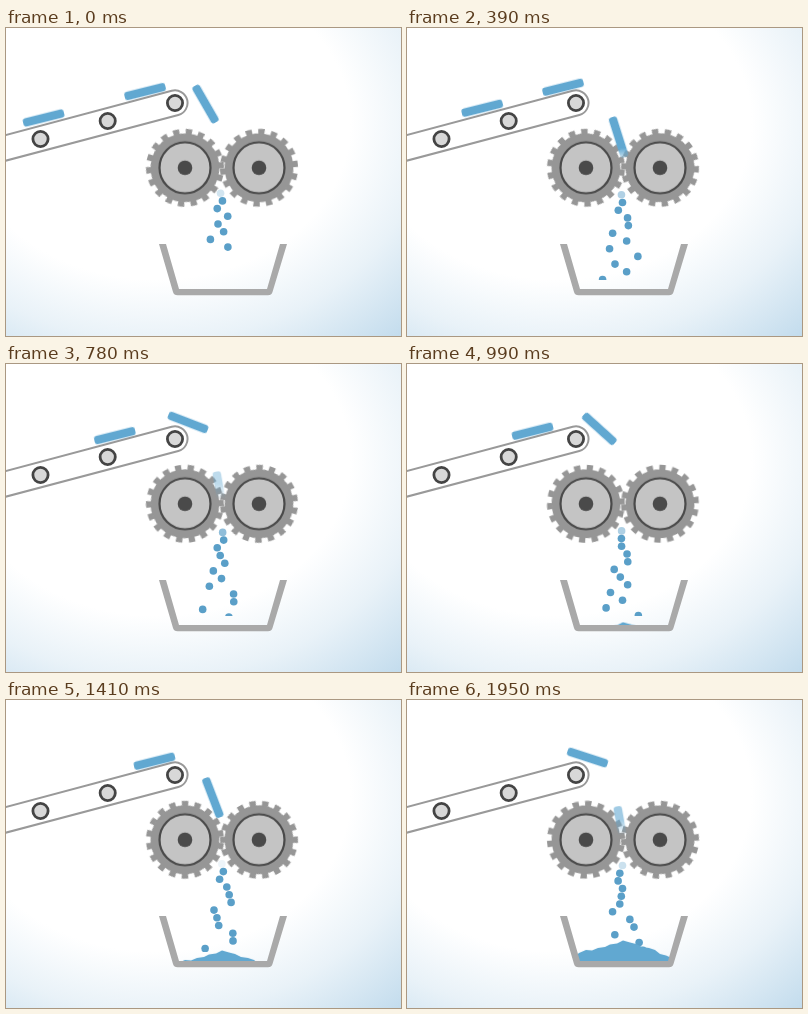
Write an HTML page without scripts that moves like this. It is 395 by 308 pixels and loops after 1980 ms.

```html
<!DOCTYPE html>
<html lang="en">
<head>
<meta charset="utf-8">
<title>Shredder</title>
<style>
@property --fall { syntax: "<number>"; inherits: true; initial-value: 0; }

html, body { margin: 0; width: 100%; height: 100%; overflow: hidden; background: #fff; }
svg { display: block; width: 100vw; height: 100vh; }

.bar, .gear, .drops, .pile { animation: 1980ms linear infinite; }
.bar { fill: #61a8d1; }
.first { animation-name: ride; }
.second { animation-name: tip; }
.third { animation-name: drop; }
.gear { animation-name: spin; }
.reverse { animation-direction: reverse; }
.pile { fill: #61a8d1; animation-name: rise; }

/* each drop leaves the nip (215.5, 161) along its own slope --s */
.drops { fill: #5a9fc8; animation-name: fall; }
.drops circle {
  --y: calc(219 - 7.7 * var(--k) + var(--fall));
  transform: translate(calc((215.5 + var(--s) * (var(--y) - 161)) * 1px), calc(var(--y) * 1px));
  opacity: calc((var(--y) - 163) / 8);
}

@keyframes fall { to { --fall: 203.6; } }
@keyframes spin { to { transform: rotate(160deg); } }
@keyframes rise { from { transform: translate(-1px, 37px); } to { transform: translate(-1px, .4px); } }

@keyframes ride {
  0% { transform: translate(37.5px, 90px) rotate(-14deg); }
  10.6% { transform: translate(58.3px, 84.5px) rotate(-14deg); }
  28.8% { transform: translate(92px, 76px) rotate(-14deg); }
  50% { transform: translate(125.5px, 67.3px) rotate(-14deg); }
  62.1% { transform: translate(141px, 63.2px) rotate(-14deg); }
  81.8% { transform: translate(157px, 59px) rotate(-14deg); }
  89.4% { transform: translate(169px, 56.7px) rotate(1deg); }
  98.5% { transform: translate(180.5px, 57.5px) rotate(18deg); }
  100% { transform: translate(182px, 58.3px) rotate(21deg); }
}
@keyframes tip {
  0% { transform: translate(139px, 63.6px) rotate(-14deg); }
  10.6% { transform: translate(150px, 60.9px) rotate(-14deg); }
  21.2% { transform: translate(157px, 59px) rotate(-14deg); }
  28.8% { transform: translate(169px, 56.7px) rotate(1deg); }
  37.9% { transform: translate(180.5px, 57.5px) rotate(18deg); }
  50% { transform: translate(192.3px, 64.8px) rotate(42deg); }
  60.6% { transform: translate(199.5px, 76px) rotate(60deg); }
  62.1% { transform: translate(200.3px, 78px) rotate(62deg); }
  71.2% { transform: translate(206.8px, 97.5px) rotate(69deg); }
  81.8% { transform: translate(212.3px, 111px) rotate(73deg); }
  89.4% { transform: translate(213px, 117px) rotate(76deg); opacity: 1; }
  98.5% { transform: translate(214px, 127px) rotate(80deg); opacity: .6; }
  100% { transform: translate(214px, 128px) rotate(80deg); opacity: .5; }
}
@keyframes drop {
  0% { transform: translate(199.5px, 76px) rotate(60deg); }
  1.5% { transform: translate(200.3px, 78px) rotate(62deg); }
  10.6% { transform: translate(206.8px, 97.5px) rotate(69deg); }
  21.2% { transform: translate(212.3px, 111px) rotate(73deg); }
  28.8% { transform: translate(213px, 117px) rotate(76deg); opacity: 1; }
  37.9% { transform: translate(214px, 127px) rotate(80deg); opacity: .6; }
  43%, 100% { transform: translate(214px, 131px) rotate(80deg); opacity: 0; }
}
</style>
</head>
<body>
<svg viewBox="0 0 395 308">
  <defs>
    <radialGradient id="sky" gradientUnits="userSpaceOnUse" cx="0" cy="0" r="1" gradientTransform="translate(150 95) scale(360 290)">
      <stop offset=".54" stop-color="#fff"/>
      <stop offset=".75" stop-color="#e9f2f8"/>
      <stop offset="1" stop-color="#c3dced"/>
    </radialGradient>
    <linearGradient id="fade" gradientUnits="userSpaceOnUse" x1="0" y1="120" x2="0" y2="135">
      <stop stop-color="#fff"/>
      <stop offset="1" stop-color="#000"/>
    </linearGradient>
    <mask id="nip" maskUnits="userSpaceOnUse" x="0" y="0" width="395" height="308">
      <rect width="395" height="308" fill="url(#fade)"/>
    </mask>
    <clipPath id="air"><rect width="395" height="252"/></clipPath>
    <clipPath id="inside"><path d="M159 216L172 262H262L275 216z"/></clipPath>
    <circle id="roller" r="7.6" fill="#d8d8d8" stroke="#444" stroke-width="2.8"/>
    <rect id="slab" x="-21" y="-4.2" width="42" height="8.4" rx="3"/>
    <g id="cog">
      <circle r="34.5" fill="#969696"/>
      <circle r="36.3" fill="none" stroke="#969696" stroke-width="5.4" pathLength="36" stroke-dasharray="1 1" stroke-dashoffset=".5"/>
    </g>
    <g id="face">
      <circle r="25.5" fill="#c4c4c4" stroke="#4a4a4a" stroke-width="2.2"/>
      <circle r="7.3" fill="#4a4a4a"/>
    </g>
  </defs>

  <rect width="395" height="308" fill="url(#sky)"/>

  <path d="M-4 108L165.700 62.800A12.500 12.500 0 0 1 172.300 87L-4 133.700" fill="none" stroke="#999" stroke-width="2"/>
  <use href="#roller" x="34.5" y="111"/>
  <use href="#roller" x="101.7" y="93"/>
  <use href="#roller" x="169" y="75"/>

  <g class="drops" clip-path="url(#air)">
    <circle r="3.8" style="--k:0;--s:.11"/>
    <circle r="3.8" style="--k:1;--s:-.22"/>
    <circle r="3.8" style="--k:2;--s:.05"/>
    <circle r="3.8" style="--k:3;--s:-.1"/>
    <circle r="3.8" style="--k:4;--s:.228"/>
    <circle r="3.8" style="--k:5;--s:-.217"/>
    <circle r="3.8" style="--k:6;--s:.08"/>
    <circle r="3.8" style="--k:7;--s:-.223"/>
    <circle r="3.8" style="--k:8;--s:.16"/>
    <circle r="3.8" style="--k:9;--s:.175"/>
    <circle r="3.8" style="--k:10;--s:-.198"/>
    <circle r="3.8" style="--k:11;--s:0"/>
    <circle r="3.8" style="--k:12;--s:-.178"/>
    <circle r="3.8" style="--k:13;--s:.086"/>
    <circle r="3.8" style="--k:14;--s:-.042"/>
    <circle r="3.8" style="--k:15;--s:-.187"/>
    <circle r="3.8" style="--k:16;--s:.144"/>
    <circle r="3.8" style="--k:17;--s:.157"/>
    <circle r="3.8" style="--k:18;--s:-.043"/>
    <circle r="3.8" style="--k:19;--s:-.08"/>
    <circle r="3.8" style="--k:20;--s:-.153"/>
    <circle r="3.8" style="--k:21;--s:.232"/>
    <circle r="3.8" style="--k:22;--s:.228"/>
    <circle r="3.8" style="--k:23;--s:.204"/>
    <circle r="3.8" style="--k:24;--s:-.104"/>
    <circle r="3.8" style="--k:25;--s:.174"/>
    <circle r="3.8" style="--k:26;--s:.126"/>
    <circle r="3.8" style="--k:27;--s:-.196"/>
    <circle r="3.8" style="--k:28;--s:-.063"/>
    <circle r="3.8" style="--k:29;--s:-.034"/>
    <circle r="3.8" style="--k:30;--s:0"/>
    <circle r="3.8" style="--k:31;--s:-.22"/>
    <circle r="3.8" style="--k:32;--s:-.22"/>
    <circle r="3.8" style="--k:33;--s:0"/>
  </g>

  <g clip-path="url(#inside)">
    <path class="pile" d="M166 258L173 252L180 249L186 249.500L192 247L199 246L204 243.500L211 242.500L217 239.500L224 241.500L230 243L236 246L243 247L249 249L254 253L260 254.500L270 259V310H166z"/>
  </g>
  <path d="M153 216h7l13 45h88l13-45h7l-14.500 48q-1 3.300-4.500 3.300H171.500q-3.500 0-4.500-3.300z" fill="#a9a9a9"/>

  <g transform="translate(179 139.800)">
    <g class="gear"><use href="#cog" transform="rotate(16)"/></g>
    <use href="#face"/>
  </g>
  <g transform="translate(253 139.800)">
    <g class="gear reverse"><use href="#cog" transform="rotate(14)"/></g>
    <use href="#face"/>
  </g>

  <g mask="url(#nip)">
    <g class="bar first"><use href="#slab"/></g>
    <g class="bar second"><use href="#slab"/></g>
    <g class="bar third"><use href="#slab"/></g>
  </g>
</svg>
</body>
</html>
```
